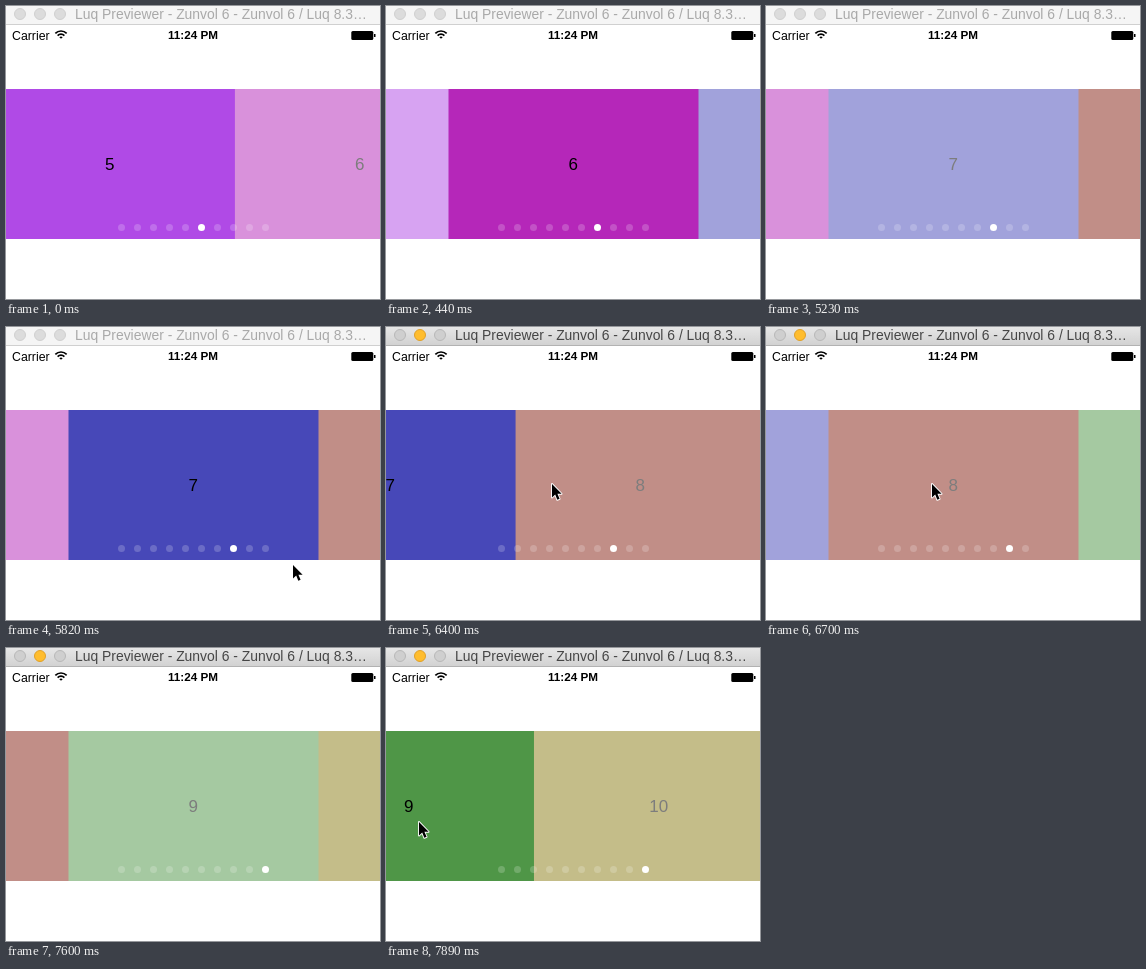
An HTML page with a canvas for the animation above (8 s loop, 374 by 293 pixels).

```html
<!DOCTYPE html>
<html lang="en">
<head>
<meta charset="utf-8">
<title>Page carousel</title>
<style>
  html, body { margin: 0; width: 100%; height: 100%; overflow: hidden; background: #fff; }
  canvas { display: block; width: 374px; height: 293px; }
</style>
</head>
<body>
<canvas id="stage"></canvas>
<script>
const W = 374, H = 293, LOOP = 8000;
const PAGE = 250, INSET = 62.5, TOP = 83, TALL = 150;
const FIRST_PAGE = 5, DIM = 0.51;
const FOCUS_TIME = 6260;
const SANS = '"Liberation Sans", Arial, sans-serif';
const colors = ['#b04ae6', '#b527b9', '#4748b8', '#852214', '#4f9647', '#8b7d17'];

// Each swipe moves on by one page; phase and speed shape its easing
const swipes = [
  { at: 0, phase: 0.638, speed: 1.27 },
  { at: 4930, phase: 0.354, speed: 0.968 },
  { at: 6400, phase: 1.147, speed: 0.763 },
  { at: 7150, phase: 1.51, speed: 0.35 },
  { at: 7890, phase: 1.036, speed: 1 }
];

// Spells in which the pointer shows, with the way it glides
const glides = [
  { at: 5820, end: 6400, x: 287, y: 238, dx: -21, dy: -82 },
  { at: 6400, end: 7150, x: 166, y: 157, dx: 0, dy: 0 },
  { at: 7890, end: LOOP, x: 33, y: 174, dx: 0, dy: 0 }
];

const canvas = document.getElementById('stage');
const ctx = canvas.getContext('2d');
const ratio = window.devicePixelRatio || 1;
canvas.width = W * ratio;
canvas.height = H * ratio;
ctx.scale(ratio, ratio);

// The screen refreshes about seven times a second
const stepsSince = (at, t) => Math.floor((t - at + 8) / 148);

const tint = (color, alpha) => `color-mix(in srgb, ${color} ${alpha * 100}%, white)`;

function rect(x, y, w, h, fill) {
  ctx.fillStyle = fill;
  ctx.fillRect(x, y, w, h);
}

function disc(x, y, r, fill, edge) {
  ctx.beginPath();
  ctx.arc(x, y, r, 0, Math.PI * 2);
  ctx.fillStyle = fill;
  ctx.fill();
  if (edge) {
    ctx.strokeStyle = edge;
    ctx.lineWidth = 1;
    ctx.stroke();
  }
}

function text(str, x, y, font, fill, align = 'left') {
  ctx.font = `${font} ${SANS}`;
  ctx.textAlign = align;
  ctx.fillStyle = fill;
  ctx.fillText(str, x, y);
}

function drawTitleBar(active) {
  const bar = ctx.createLinearGradient(0, 0, 0, 18);
  bar.addColorStop(0, active ? '#e6e6e6' : '#f5f5f5');
  bar.addColorStop(1, active ? '#d2d2d2' : '#f5f5f5');
  rect(0, 0, W, 18, bar);
  rect(0, 18, W, 1, active ? '#b2b2b2' : '#d0d0d0');
  for (let i = 0; i < 3; i++) {
    const lit = active && i === 1;
    const fill = lit ? '#ffbd2e' : active ? '#cfcfcf' : '#dcdcdc';
    const edge = lit ? '#e0a028' : active ? '#b8b8b8' : '#d0d0d0';
    disc(14 + i * 20, 8, 5.5, fill, edge);
  }
  text('Luq Previewer - Zunvol 6 - Zunvol 6 / Luq 8.3…', 69, 13, '13.9px',
    active ? '#464646' : '#a9a9a9');
}

function drawStatusBar() {
  text('Carrier', 6, 33.5, '12.3px', '#000');
  text('11:24 PM', 187, 33, 'bold 11.7px', '#000', 'center');

  ctx.strokeStyle = '#000';
  ctx.lineWidth = 1.7;
  for (const r of [1.5, 4.8, 8]) {
    ctx.beginPath();
    ctx.arc(55, 33, r, -Math.PI * 0.75, -Math.PI * 0.25);
    ctx.stroke();
  }

  ctx.beginPath();
  ctx.roundRect(345.3, 25, 22, 9, 1.5);
  ctx.fillStyle = '#000';
  ctx.fill();
  rect(368, 28, 1.5, 3, '#000');
}

// Current page, distance it is dragged, and whether it is lit
function scrollAt(t) {
  const i = swipes.findLastIndex(s => s.at <= t);
  const { at, phase, speed } = swipes[i];
  const left = k => PAGE * Math.exp(-((phase + k * speed) ** 2));
  const settled = k => left(k) < 1.5;
  const k = stepsSince(at, t);
  const page = FIRST_PAGE + i;
  return settled(k)
    ? { page: page + 1, drag: 0, lit: settled(k - 1) }
    : { page, drag: PAGE - left(k), lit: true };
}

function drawPages({ page, drag, lit }) {
  for (let i = page - 1; i <= page + 2; i++) {
    const color = colors[i - FIRST_PAGE];
    const left = INSET + PAGE * (i - page) - drag;
    if (!color || left >= W || left + PAGE <= 0) continue;
    const alpha = lit && i === page ? 1 : DIM;
    // Overdrawn by the next page, so edges blend without a gap
    rect(left, TOP, W - left, TALL, tint(color, alpha));
    text(i, left + PAGE / 2 - 0.3, 164, '17px', tint('black', alpha), 'center');
  }
  for (let i = 0; i < 10; i++) {
    disc(115.5 + i * 16, 221.5, 3.5, i === page ? '#fff' : 'rgba(255,255,255,0.2)');
  }
}

const arrow = new Path2D('M0 0V13.5L3.2 10.6L5.3 15.8L7.6 14.8L5.4 9.8H9.6Z');

function drawPointer(t) {
  const glide = glides.find(g => g.at <= t && t < g.end);
  if (!glide) return;
  const u = Math.min(1, stepsSince(glide.at, t) / 4.3);
  ctx.save();
  ctx.translate(glide.x + glide.dx * u, glide.y + glide.dy * u * (2 - u));
  ctx.strokeStyle = '#fff';
  ctx.lineWidth = 1.8;
  ctx.lineJoin = 'round';
  ctx.stroke(arrow);
  ctx.fillStyle = '#000';
  ctx.fill(arrow);
  ctx.restore();
}

function draw(t) {
  rect(0, 0, W, H, '#fff');
  drawTitleBar(t >= FOCUS_TIME);
  drawStatusBar();
  drawPages(scrollAt(t));
  drawPointer(t);
}

const start = performance.now();
function tick() {
  draw((performance.now() - start) % LOOP);
  requestAnimationFrame(tick);
}
tick();
</script>
</body>
</html>
```
